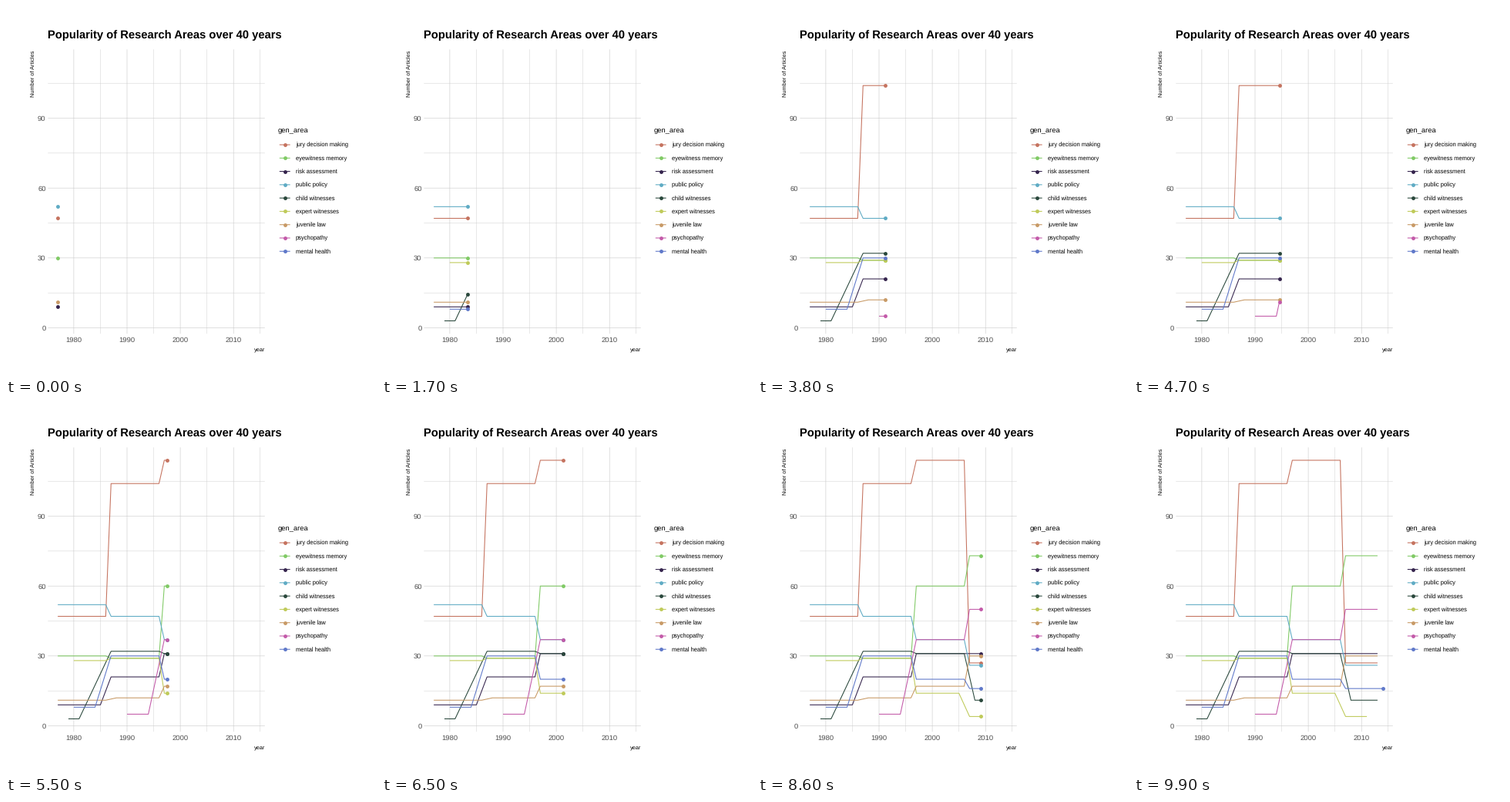
A matplotlib script that plays this animation: 480 px wide and 480 px high, repeating every 10000 ms.

```python
import numpy as np
import matplotlib.pyplot as plt
from matplotlib.animation import FuncAnimation

SIZE, DPI = 480, 80
PX = 72 / DPI  # points per pixel
FRAMES, INTERVAL = 100, 100
START, END = 1977, 2014
LEFT, RIGHT, TOP, BOTTOM = 54.4, 335.8, 56.3, 425.1
SHIFTS = [1987, 1997, 2007]  # each level is reached within one year

plt.rcParams.update({"font.family": "Liberation Sans", "text.hinting": "none"})
fig = plt.figure(figsize=(SIZE / DPI, SIZE / DPI), dpi=DPI, facecolor="white")
ax = fig.add_axes([0, 0, 1, 1])
ax.set(xlim=(0, SIZE), ylim=(SIZE, 0))
ax.axis("off")


def px(year):
    return 87.9 + (np.asarray(year) - 1980) * 6.91


def py(count):
    return 417.5 - np.asarray(count) * 3.022


def label(x, y, text, size, **kw):
    ax.text(x, y, text, fontsize=size * PX, **kw)


def stroke(xs, ys, color, width=1.07, z=4):
    return ax.plot(xs, ys, color=color, lw=width * PX, zorder=z, snap=False,
                   solid_capstyle="butt", solid_joinstyle="round")[0]


def dot(x, y, color):
    return ax.plot(x, y, "o", color=color, ms=4.9 * PX, mew=0, zorder=5,
                   snap=False)[0]


class Area:
    """Levels held for a decade each; ramps maps a shift to its own span."""

    def __init__(self, name, color, levels, first=START, last=2013, ramps={}):
        self.name, self.color, self.last = name, color, last
        spans = [ramps.get(s, (s - 1, s)) for s in SHIFTS[1 - len(levels):]]
        self.years = [first, *np.ravel(spans), last]
        self.counts = np.repeat(levels, 2)
        self.trail = stroke([], [], color)
        self.head = dot([], [], color)

    def show(self, now):
        tip = min(now, self.last)
        xs = [y for y in self.years if y < tip] + [tip]
        if now < self.years[0]:
            xs = []
        ys = np.interp(xs, self.years, self.counts)
        self.trail.set_data(px(xs), py(ys))
        # the marker disappears once its series has ended
        end = slice(-1, None) if now <= self.last else slice(0)
        self.head.set_data(px(xs[end]), py(ys[end]))


areas = [
    Area("jury decision making", "#c5735f", [47, 104, 114, 27]),
    Area("eyewitness memory", "#80ca65", [30, 29, 60, 73]),
    Area("risk assessment", "#35244d", [9, 21, 31, 31],
         ramps={1987: (1985, 1987)}),
    Area("public policy", "#5fabc4", [52, 47, 37, 26]),
    Area("child witnesses", "#2a483c", [3, 32, 31, 11], first=1979,
         ramps={1987: (1981, 1987), 2007: (2006, 2008)}),
    Area("expert witnesses", "#bfca59", [28, 29, 14, 4], first=1980, last=2011,
         ramps={2007: (2005, 2007)}),
    Area("juvenile law", "#c89a66", [11, 12, 17, 30],
         ramps={1987: (1986, 1988)}),
    Area("psychopathy", "#c35aa9", [5, 37, 50], first=1990,
         ramps={1997: (1994, 1997)}),
    Area("mental health", "#5f78c9", [8, 30, 20, 16], first=1980, last=END,
         ramps={1987: (1984, 1987)}),
]


def grid_line(xs, ys, major):
    stroke(xs, ys, "#cccccc", 0.6 if major else 0.45, z=1)


def draw_grid():
    for year in range(1980, 2016, 5):
        major = year % 10 == 0
        x = px(year)
        grid_line([x, x], [TOP, BOTTOM], major)
        if major:
            label(x, 436.3, year, 9.45, ha="center", color="#4d4d4d")
    for count in range(0, 106, 15):
        major = count % 30 == 0
        y = py(count)
        grid_line([LEFT, RIGHT], [y, y], major)
        if major:
            label(51.6, y + 3.4, count, 9.45, ha="right", color="#4d4d4d")


def draw_legend():
    label(353, 164.6, "gen_area", 9.4)
    for i, area in enumerate(areas):
        y = 180 + 17.28 * i
        stroke([354.8, 368.6], [y, y], area.color)
        dot([361.7], [y], area.color)
        label(376, y + 2.8, area.name, 7.5)


draw_grid()
draw_legend()
label(54, 42, "Popularity of Research Areas over 40 years", 14.75, weight="bold")
label(36.6, 57.2, "Number of Articles", 7.4, rotation=90,
      rotation_mode="anchor", ha="right", va="baseline")
label(336, 448.4, "year", 7.4, ha="right")


def update(i):
    now = START + (END - START) * i / (FRAMES - 1)
    for area in areas:
        area.show(now)


anim = FuncAnimation(fig, update, frames=FRAMES, interval=INTERVAL,
                     repeat=True, repeat_delay=0, blit=False)
plt.show()
```
